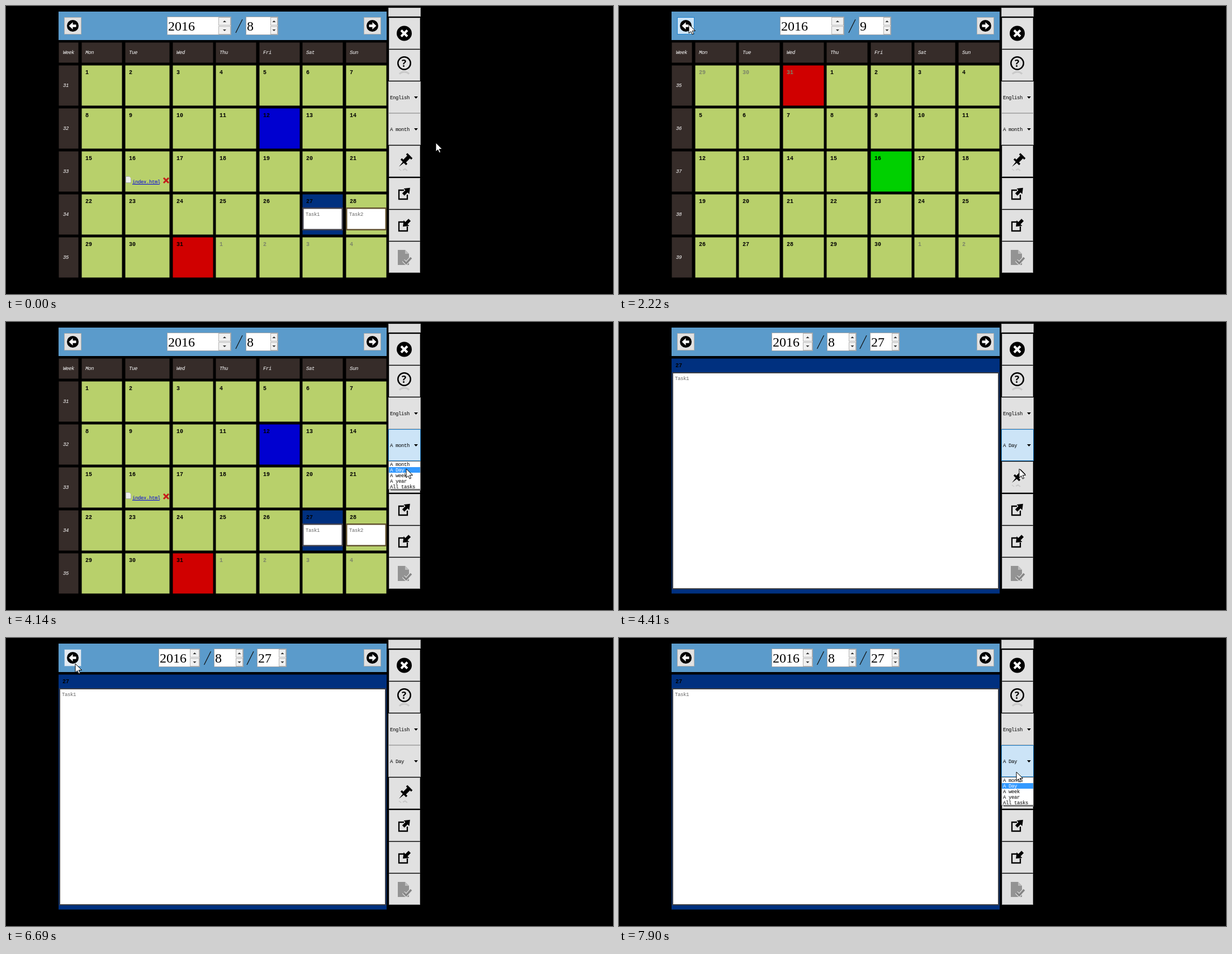
Write an HTML page with a canvas that moves like this. It is 1086x516 px and loops after 8 s.

```html
<!DOCTYPE html>
<html lang="en">
<head>
<meta charset="utf-8">
<title>Task calendar</title>
<style>
html, body { margin: 0; height: 100%; overflow: hidden; background: #000; }
canvas { display: block; }
</style>
</head>
<body>
<canvas id="stage" width="1086" height="516"></canvas>
<script>
const ctx = document.getElementById('stage').getContext('2d');
const LOOP = 8000, START = 500, BURST = 1080, STEP = 131, MOVE = 500;
const GREEN = '#b8d06b', NAVY = '#00307f', BROWN = '#362c29', GREY = '#e1e1e1', OLIVE = '#62522f';
const SMALL = '9px "Liberation Mono", monospace';
const BOLD = 'bold 10px "Liberation Mono", monospace';

// Pointer moves: [start, x, y], each eased over MOVE ms
const moves = [
  [START, 655, 38], [1600, 125, 33], [2555, 709, 220], [3300, 716, 263],
  [4396, 871, 240], [4700, 653, 36], [5930, 124, 46], [6970, 711, 240]
];
const clicks = [1150, 2100, 5210, 6290];

const within = (t, a, b) => t >= a && t < b;

// The screen refreshes in bursts of eight steps
function refreshTime(t) {
  if (t < START) return 0;
  const phase = (t - START) % BURST;
  return t - phase + STEP * Math.min(7, Math.floor(phase / STEP));
}

function pointerAt(t) {
  let x = 769, y = 245;
  for (const [start, toX, toY] of moves) {
    const f = Math.min(1, Math.max(0, (t - start) / MOVE));
    const eased = f * f * (3 - 2 * f);
    x += (toX - x) * eased;
    y += (toY - y) * eased;
  }
  return [Math.round(x), Math.round(y)];
}

function rect(x, y, x2, y2, fill, border, width = 1) {
  ctx.fillStyle = border || fill;
  ctx.fillRect(x, y, x2 - x, y2 - y);
  if (!border) return;
  ctx.fillStyle = fill;
  ctx.fillRect(x + width, y + width, x2 - x - 2 * width, y2 - y - 2 * width);
}

// Calendar cell with slightly soft edges
const cell = (x, y, x2, y2, fill) => rect(x + 0.5, y + 0.5, x2 - 0.5, y2 - 0.5, fill);

function text(str, x, y, color = '#000', font = SMALL) {
  ctx.font = font;
  ctx.letterSpacing = font.includes('9px') ? '-0.4px' : '0px';
  ctx.fillStyle = color;
  ctx.fillText(str, x, y);
}

function trace(points) {
  ctx.beginPath();
  for (let i = 0; i < points.length; i += 2) ctx.lineTo(points[i], points[i + 1]);
}

function poly(points, fill) {
  trace(points);
  ctx.fillStyle = fill;
  ctx.fill();
}

function line(points, color, width) {
  trace(points);
  ctx.strokeStyle = color;
  ctx.lineWidth = width;
  ctx.stroke();
}

function disc(x, y, r, color = '#000') {
  ctx.beginPath();
  ctx.arc(x, y, r, 0, 7);
  ctx.fillStyle = color;
  ctx.fill();
}

function cross(x, y, r, color, width) {
  line([x - r, y - r, x + r, y + r], color, width);
  line([x + r, y - r, x - r, y + r], color, width);
}

// Arrow along +x, centred on its head's base
const arrow = (tip, half, tail, thick, color) =>
  poly([tip, 0, 0, -half, 0, -thick, -tail, -thick, -tail, thick, 0, thick, 0, half], color);

function at(x, y, angle, draw) {
  ctx.save();
  ctx.translate(x, y);
  ctx.rotate(angle);
  draw();
  ctx.restore();
}

function button(x, y, x2, y2, state = 0) {
  rect(x, y, x2, y2, [GREY, '#e3ebf3', '#cce4f7'][state], ['#adadad', '#7fb0d6', '#1f82cf'][state]);
}

function navButton(x, angle, state) {
  button(x, 20, x + 31, 51, state);
  at(x + 15.5, 35.5, angle, () => {
    disc(0, 0, 10.5);
    arrow(7, 6.5, 6, 2.2, '#fff');
  });
}

function spinBox(value, x, x2, buttonWidth) {
  rect(x, 19, x2, 52, '#fff', '#a0a5aa');
  text(value, x + 2, 44, '#000', '24px "Liberation Serif", serif');
  const right = x2 - 1, left = right - buttonWidth, mid = right - buttonWidth / 2;
  for (const [y, dir] of [[20, -1], [36, 1]]) {
    rect(left, y, right, y + 15, '#f0f0f0', '#b4b4b4');
    const tip = y + 7.5 + dir * 1.5;
    poly([mid - 3, tip - dir * 3, mid + 3, tip - dir * 3, mid, tip], '#333');
  }
}

const slash = x => line([x, 48, x + 12, 24], '#111', 1.3);

function header(daily, month, day, leftState, rightState) {
  rect(94, 10, 681, 61, '#5b9bcb');
  navButton(104, Math.PI, leftState);
  navButton(640, 0, rightState);
  if (daily) {
    spinBox('2016', 273, 347, 17);
    slash(354.5);
    spinBox(month, 372, 425, 13);
    slash(431);
    spinBox(day, 449, 502, 13);
  } else {
    spinBox('2016', 288, 403, 22);
    slash(411);
    spinBox(month, 429, 487, 13);
  }
}

function monthView(month) {
  const august = month === 8;
  const length = august ? 31 : 30, firstDay = august ? 1 : -2, firstWeek = august ? 31 : 35;
  const special = august ? { 12: '#0000d0', 27: NAVY, 31: '#d00000' } : { 0: '#d00000', 16: '#00d000' };
  // The file link widens Tuesday in August
  const left = i => Math.round(august ? 135 + 77.5 * i + (i > 1 ? 7.9 : 0) : 135.8 + 78.5 * i);
  const right = i => left(i) + (august ? (i === 1 ? 80 : 73) : 74);
  const weekEnd = august ? 130 : 131;
  const label = (str, x, y) => text(str, x, y, '#fff', 'italic ' + SMALL);

  cell(94, 65, weekEnd, 102, BROWN);
  label('Week', 102, 86);
  ['Mon', 'Tue', 'Wed', 'Thu', 'Fri', 'Sat', 'Sun'].forEach((name, i) => {
    cell(left(i), 65, right(i), 102, BROWN);
    label(name, left(i) + 7, 86);
  });
  for (let row = 0; row < 5; row++) {
    const y = 106 + row * 77;
    cell(94, y, weekEnd, y + 73, BROWN);
    label(firstWeek + row, 102, y + 39);
    for (let i = 0; i < 7; i++) {
      const n = row * 7 + i + firstDay;
      const shown = n < 1 ? n + 31 : n > length ? n - length : n;
      cell(left(i), y, right(i), y + 73, special[n] || GREEN);
      text(shown, left(i) + 7, y + 16, shown === n ? '#000' : '#7c8568', BOLD);
    }
  }
  if (august) tasks();
}

function tasks() {
  rect(214, 305, 224, 317, '#eee', '#8f9590', 0.7);
  poly([220, 305, 224, 305, 224, 309], GREEN);
  text('index.html', 226, 318, '#0000e0');
  rect(226, 319, 275, 320, '#0000e0');
  cross(286.5, 312.5, 4.5, '#c61a1a', 3);
  rect(530, 361, 603, 402, '#fff', '#41404c', 2.5);
  text('Task1', 536, 376, '#666');
  rect(608, 361, 681, 402, '#fff', OLIVE, 2.5);
  text('Task2', 614, 376, '#666');
}

function dayView(day) {
  const first = day === 27;
  rect(94, 65.5, 681, 486.5, first ? NAVY : GREEN);
  text(day, 101, 81, '#000', BOLD);
  rect(95, 90, 680, 479, '#fff', first ? '#3c3e45' : OLIVE, 2);
  text('Task' + (first ? 1 : 2), 100, 104, '#666');
}

function combo(label, y, state) {
  button(684, y - 1, 742, y + 56, state);
  text(label, 687, y + 31);
  poly([730, y + 26, 737, y + 26, 733.5, y + 30], '#000');
}

function closeIcon() {
  disc(712.5, 49, 13.5);
  cross(712.5, 49, 5.5, '#fff', 4);
}

function helpIcon() {
  disc(712.5, 102.5, 12.5);
  disc(712.5, 102.5, 10, GREY);
  text('?', 708, 109, '#000', 'bold 17px "Open Sans", sans-serif');
  ctx.beginPath();
  ctx.arc(712.5, 130, 12, 3.9, 5.52);
  ctx.strokeStyle = '#c9c9c9';
  ctx.lineWidth = 3;
  ctx.stroke();
}

function pinIcon() {
  at(703, 288, -Math.PI / 4, () => {
    poly([0, 0, 12, -1.5, 12, 1.5], '#000');
    rect(11, -7, 14.5, 7, '#000');
    rect(14, -3.5, 25, 3.5, '#000');
    rect(24.5, -6.5, 28, 6.5, '#000');
  });
  line([703, 292, 707, 295], '#c8c8c8', 1.5);
  line([710, 294, 714, 292, 718, 295], '#c8c8c8', 2);
}

function shareIcon(y, angle) {
  line([712, y - 6, 703, y - 6, 703, y + 10, 718, y + 10, 718, y + 2], '#000', 2.3);
  at(716.5, y - 4, angle, () => arrow(9, 7, 8, 2.8, '#000'));
}

function documentIcon() {
  poly([701, 437, 714, 437, 721, 444, 721, 464, 701, 464], '#939393');
  poly([714, 437, 721, 444, 714, 444], '#bdbdbd');
  const check = [711, 456, 716, 461, 725, 451];
  line(check, GREY, 6);
  line(check, '#858585', 3.5);
}

function sidebar(comboLabel, comboState) {
  rect(684, 3, 742, 19, '#dcdcdc', '#adadad');
  for (let i = 0; i < 8; i++) {
    const y = Math.round(21 + 57.3 * i);
    if (i === 2) combo('English', y, 0);
    else if (i === 3) combo(comboLabel, y, comboState);
    else button(685, y, 741, y + 56);
  }
  closeIcon();
  helpIcon();
  pinIcon();
  shareIcon(336, -Math.PI / 4);
  shareIcon(393, Math.PI * 0.75);
  documentIcon();
}

function popup(selected) {
  rect(688, 298, 742, 302, '#777');
  rect(684, 249, 742, 300, '#fff', '#777');
  ['A month', 'A Day', 'A week', 'A year', 'All tasks'].forEach((label, i) => {
    const y = 250 + i * 10;
    if (i === selected) rect(685, y, 741, y + 10, '#3399ff');
    text(label, 687, y + 8, i === selected ? '#fff' : '#000');
  });
}

function pointer(x, y) {
  at(x, y, 0, () => {
    const shape = [0, 0, 0, 16, 3.7, 12.6, 6.2, 18, 8.6, 17, 6.2, 11.6, 11.5, 11.5, 0, 0];
    poly(shape, '#fff');
    line(shape, '#000', 1);
  });
}

function draw(t) {
  const [x, y] = pointerAt(t);
  const daily = t >= 4260;
  const day = within(t, 5240, 6420) ? 28 : 27;
  const month = within(t, 1270, 2470) ? 9 : 8;
  const open = within(t, 3430, 4260) || t >= 7760;
  const active = open || within(t, 4260, 4500);
  const pressed = clicks.some(c => within(t, c, c + 300));
  const hover = (x1, y1, x2, y2) => within(x, x1, x2) && within(y, y1, y2) ? (pressed ? 2 : 1) : 0;

  rect(0, 0, 1086, 516, '#000');
  header(daily, month, day, hover(104, 20, 135, 51), hover(640, 20, 671, 51));
  daily ? dayView(day) : monthView(month);
  sidebar(daily ? 'A Day' : 'A month', active ? 2 : hover(684, 192, 742, 250));
  if (open) popup(daily || y >= 260 ? 1 : 0);
  pointer(x, y);
}

function frame(now) {
  draw(refreshTime(now % LOOP));
  requestAnimationFrame(frame);
}
requestAnimationFrame(frame);
</script>
</body>
</html>
```
